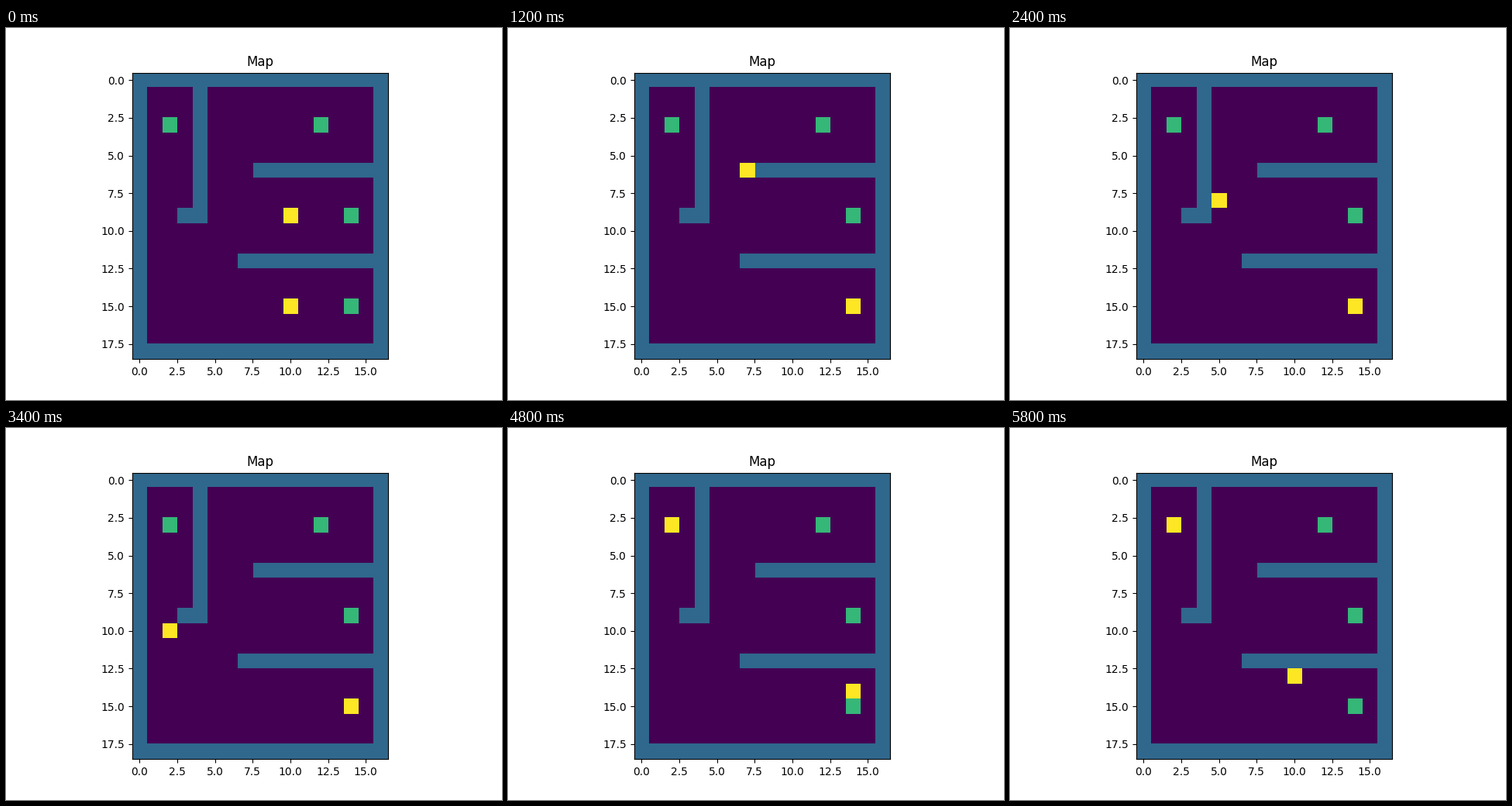
These frames come from a looping animation (640 by 480 pixels, 6 s). A matplotlib script:

```python
import numpy as np
import matplotlib.pyplot as plt
from matplotlib.animation import FuncAnimation

WALL, TASK, AGENT = 1, 2, 3
STEPS = {"L": (-1, 0), "R": (1, 0), "U": (0, -1), "D": (0, 1), ".": (0, 0)}


def build_map():
    grid = np.zeros((19, 17), dtype=int)
    grid[[0, -1], :] = WALL
    grid[:, [0, -1]] = WALL
    grid[:10, 4] = WALL
    grid[9, 3] = WALL
    grid[6, 8:] = WALL
    grid[12, 7:] = WALL
    for x, y in [(2, 3), (12, 3), (14, 9), (14, 15)]:
        grid[y, x] = TASK
    return grid


def walk(start, moves):
    path = [start]
    for move in moves:
        dx, dy = STEPS[move]
        x, y = path[-1]
        path.append((x + dx, y + dy))
    return path


paths = [
    walk((10, 9), "UU" + "LLL" + "UU" + "LL" + "D" * 5 + "LLL" + "U" * 7 + "." * 5),
    walk((10, 15), "RRRR" + "." * 19 + "UU" + "LLLL"),
]
base = build_map()


def state(i):
    grid = base.copy()
    for path in paths:
        x, y = path[i]
        grid[y, x] = AGENT
    return grid


fig, ax = plt.subplots(figsize=(6.4, 4.8), dpi=100)
image = ax.imshow(state(0), cmap="viridis", vmin=0, vmax=AGENT)
ax.set_title("Map")


def update(i):
    image.set_data(state(i))
    return [image]


anim = FuncAnimation(fig, update, frames=len(paths[0]), interval=200, repeat=True)
plt.show()
```
